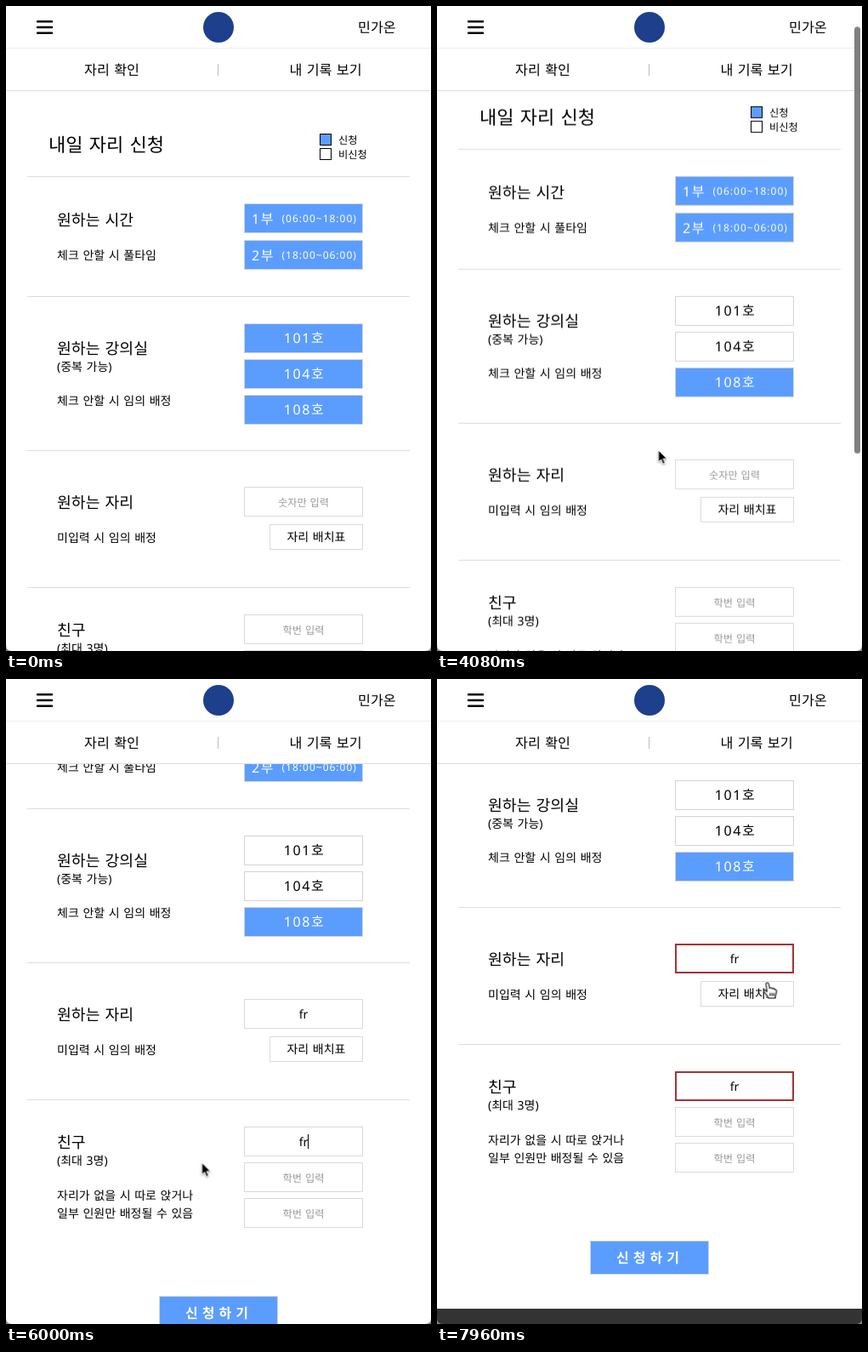
An HTML page for the animation above (8 s loop, 500 px wide and 758 px high).

```html
<!DOCTYPE html>
<html lang="ko">
<head>
<meta charset="utf-8">
<title>자리 신청</title>
<style>
html, body { margin: 0; width: 100%; height: 100%; overflow: hidden; background: #fff; }
svg { display: block; width: 100vw; height: 100vh; font-family: "Noto Sans", "Noto Sans CJK KR", "Noto Sans CJK", sans-serif; }
rect, line { shape-rendering: crispEdges; }
text { stroke: none; fill: currentColor; font-size: 14px; word-spacing: .07em; white-space: pre; text-rendering: geometricPrecision; }
.title { font-size: 22px; }
.head { font-size: 18.3px; }
.nav { font-size: 16.2px; }
.tiny { font-size: 12.2px; }
.mid { text-anchor: middle; }
.room { font-size: 16px; letter-spacing: 1.6px; }
.time { font-size: 12px; letter-spacing: 1px; }
.hint { font-size: 12.2px; color: #999; text-anchor: middle; }
.send { font-size: 16px; font-weight: 700; letter-spacing: 5px; }
.box { fill: #fff; stroke: #dadada; }
.rule { stroke: #ddd; }
.pick { fill: #5b9dff; stroke: #d3d3d3; color: #fff; }
.err { fill: none; stroke: #a83232; stroke-width: 2; }

/* everything shares one 8 s clock */
.scroll { animation: scroll 8s infinite; }
.step, .pick { animation: 8s step-end infinite; }
.hid { opacity: 0; }

@keyframes scroll {
  0% { transform: none; }
  50% { transform: none; animation-timing-function: cubic-bezier(.4, .15, .8, .8); }
  52.95%, 53.1% { transform: translateY(calc(var(--k) * 138px)); animation-timing-function: cubic-bezier(.1, .4, .4, 1); }
  57.5%, 78.5% { transform: translateY(calc(var(--k) * 189px)); animation-timing-function: ease-out; }
  81.4%, 100% { transform: translateY(calc(var(--k) * 254px)); }
}
.bar { opacity: 0; animation: bar 8s linear infinite; }
@keyframes bar {
  0%, 50.2% { opacity: 0; }
  50.4%, 61% { opacity: 1; }
  64%, 78.7% { opacity: 0; }
  78.9%, 84.4% { opacity: 1; }
  87.5%, 100% { opacity: 0; }
}

.part2 { animation-name: part2; }
.room1 { animation-name: room1; }
.room2 { animation-name: room2; }
@keyframes part2 {
  20.9% { fill: #fff; color: #000; }
  27.9% { fill: #5b9dff; color: #fff; }
}
@keyframes room1 { 37.4% { fill: #fff; color: #000; } }
@keyframes room2 { 42.4% { fill: #fff; color: #000; } }

.seatHint { animation-name: seatHint; }
.seatF { animation-name: seatF; }
.seatFr { animation-name: seatFr; }
.palHint { animation-name: palHint; }
.palF { animation-name: palF; }
.palFr { animation-name: palFr; }
.alert { animation-name: alert; }
@keyframes seatHint { 64.9% { opacity: 0; } }
@keyframes seatF { 64.9% { opacity: 1; } 66.4% { opacity: 0; } }
@keyframes seatFr { 66.4% { opacity: 1; } }
@keyframes palHint { 72.9% { opacity: 0; } }
@keyframes palF { 72.9% { opacity: 1; } 73.9% { opacity: 0; } }
@keyframes palFr { 73.9% { opacity: 1; } }
@keyframes alert { 94.9% { opacity: 1; } }

.caret { animation-name: caret; }
@keyframes caret {
  61.4% { opacity: 1; transform: translate(320px, 574px); }
  64.9% { opacity: 1; transform: translate(353px, 574px); }
  66.4% { opacity: 1; transform: translate(355px, 574px); }
  69.4% { opacity: 1; transform: translate(325px, 724px); }
  72.9% { opacity: 1; transform: translate(353px, 724px); }
  73.9% { opacity: 1; transform: translate(355px, 724px); }
  80.2% { opacity: 0; transform: translate(355px, 724px); }
  86.5% { opacity: 1; transform: translate(355px, 724px); }
  92.7% { opacity: 0; transform: translate(355px, 724px); }
}

.mouse { animation: mouse 8s ease-in-out infinite; }
@keyframes mouse {
  0% { transform: translate(252px, 770px); animation-timing-function: ease-out; }
  6%, 9% { transform: translate(236px, 425px); }
  16%, 29.5% { transform: translate(346px, 299.5px); }
  35.5%, 37.5% { transform: translate(326px, 394px); }
  42%, 45% { transform: translate(326px, 437.5px); }
  47%, 55% { transform: translate(260.5px, 522px); }
  59%, 65% { transform: translate(334.5px, 405px); }
  73.9% { transform: translate(290px, 548px); animation-timing-function: ease-out; }
  75%, 84% { transform: translate(230.5px, 568.5px); }
  92.5%, 95.1% { transform: translate(236px, 685px); animation-timing-function: ease-in; }
  98% { transform: translate(418px, 420px); animation-timing-function: ease-out; }
  99.4%, 100% { transform: translate(388.5px, 357.5px); }
}
.arrow { animation-name: arrow; }
.hand { animation-name: hand; }
.beam { animation-name: beam; }
@keyframes arrow {
  .4% { opacity: 1; }
  14.5% { opacity: 0; }
  31% { opacity: 1; }
  34% { opacity: 0; }
  46.2% { opacity: 1; }
  58% { opacity: 0; }
  73.9% { opacity: 1; }
  89.8% { opacity: 0; }
  95.9% { opacity: 1; }
  98.6% { opacity: 0; }
}
@keyframes hand {
  14.5% { opacity: 1; }
  31% { opacity: 0; }
  34% { opacity: 1; }
  46.2% { opacity: 0; }
  89.8% { opacity: 1; }
  95.9% { opacity: 0; }
  98.6% { opacity: 1; }
}
@keyframes beam { 58% { opacity: 1; } 64.9% { opacity: 0; } }
</style>
</head>
<body>
<svg viewBox="0 0 500 758" preserveAspectRatio="none">
  <g class="scroll" style="--k:-1">
    <text class="title" x="50" y="171">내일 자리 신청</text>
    <rect x="369.5" y="150.5" width="13" height="13" fill="#5b9dff" stroke="#000"/>
    <rect x="369.5" y="167.5" width="13" height="13" fill="#fff" stroke="#000"/>
    <text class="tiny" x="391" y="161.5">신청</text>
    <text class="tiny" x="391" y="178.8">비신청</text>
    <path class="rule" shape-rendering="crispEdges" d="M25 200.5H475M25 341.5H475M25 522.5H475M25 683.5H475"/>

    <text class="head" x="60" y="257.7">원하는 시간</text>
    <text x="60" y="298.2">체크 안할 시 풀타임</text>
    <g class="pick">
      <rect x="280.5" y="232.5" width="139" height="34"/>
      <text class="room" x="289" y="256">1부</text>
      <text class="time" x="324.5" y="254.3">(06:00~18:00)</text>
    </g>
    <g class="pick part2">
      <rect x="280.5" y="275.5" width="139" height="34"/>
      <text class="room" x="289" y="299">2부</text>
      <text class="time" x="324.5" y="297.3">(18:00~06:00)</text>
    </g>

    <text class="head" x="60" y="408.5">원하는 강의실</text>
    <text x="60" y="428.8">(중복 가능)</text>
    <text x="60" y="469.4">체크 안할 시 임의 배정</text>
    <g class="pick room1">
      <rect x="280.5" y="373.5" width="139" height="34"/>
      <text class="room mid" x="351" y="396.3">101호</text>
    </g>
    <g class="pick room2">
      <rect x="280.5" y="415.5" width="139" height="34"/>
      <text class="room mid" x="351" y="438.3">104호</text>
    </g>
    <g class="pick">
      <rect x="280.5" y="457.5" width="139" height="34"/>
      <text class="room mid" x="351" y="480.3">108호</text>
    </g>

    <text class="head" x="60" y="589.8">원하는 자리</text>
    <text x="60" y="630.2">미입력 시 임의 배정</text>
    <rect class="box" x="280.5" y="565.5" width="139" height="34"/>
    <rect class="err step hid alert" x="281" y="566" width="138" height="33"/>
    <text class="hint step seatHint" x="350" y="587.6">숫자만 입력</text>
    <text class="mid step hid seatF" x="350" y="588">f</text>
    <text class="mid step hid seatFr" x="350" y="588">fr</text>
    <rect class="box" x="310.5" y="609.5" width="109" height="29"/>
    <text class="mid" x="365" y="629.2">자리 배치표</text>

    <text class="head" x="60" y="739.8">친구</text>
    <text x="60" y="760.2">(최대 3명)</text>
    <text x="60" y="801.4">자리가 없을 시 따로 앉거나</text>
    <text x="60" y="822">일부 인원만 배정될 수 있음</text>
    <rect class="box" x="280.5" y="715.5" width="139" height="34"/>
    <rect class="box" x="280.5" y="757.5" width="139" height="34"/>
    <rect class="box" x="280.5" y="799.5" width="139" height="34"/>
    <rect class="err step hid alert" x="281" y="716" width="138" height="33"/>
    <text class="hint step palHint" x="350" y="737.6">학번 입력</text>
    <text class="mid step hid palF" x="350" y="738">f</text>
    <text class="mid step hid palFr" x="350" y="738">fr</text>
    <text class="hint" x="350" y="779.6">학번 입력</text>
    <text class="hint" x="350" y="821.6">학번 입력</text>
    <rect class="step hid caret" width="1" height="17"/>

    <g class="pick">
      <rect x="180.5" y="914.5" width="139" height="39"/>
      <text class="send mid" x="250.5" y="940.4">신청하기</text>
    </g>
    <rect y="994" width="500" height="154" fill="#333"/>
  </g>

  <rect width="500" height="100" fill="#fff"/>
  <path d="M0 49.5H500" stroke="#eee" shape-rendering="crispEdges"/>
  <path class="rule" d="M0 99.5H500" shape-rendering="crispEdges"/>
  <path d="M37 18.3H54M37 25H54M37 31.7H54" stroke="#000" stroke-width="2.4" stroke-linecap="round"/>
  <circle cx="250" cy="25" r="18" fill="#1d3f8c"/>
  <text class="nav" x="414" y="31">민가온</text>
  <text class="nav mid" x="124.5" y="81">자리 확인</text>
  <text class="nav mid" x="376" y="81">내 기록 보기</text>
  <path d="M249.5 68V82" stroke="#bbb" shape-rendering="crispEdges"/>

  <g class="bar">
    <rect class="scroll" style="--k:.656;shape-rendering:auto" x="491" y="3.3" width="7" height="501.5" rx="3.5" fill="#7f7f7f"/>
  </g>
  <path d="M0 751V758H7Q0 758 0 751ZM500 751V758H493Q500 758 500 751Z" fill="#888"/>

  <g class="mouse">
    <path class="step hid arrow" d="M0 0V14L3.2 11 5.4 16.2 7.8 15.2 5.6 10.1H10Z" fill="#000" stroke="#fff" stroke-width="1" style="filter:drop-shadow(0 1px 1px #0006)"/>
    <path class="step hid hand" d="M-1.5 1C-1.5-1 1.4-1 1.8 1L2.8 6C3.5 5 5.5 5 6 6.6 6.8 5.6 8.4 6 8.6 7.4 9.8 6.8 11 7.8 10.8 9.4 10.8 12 10 13.5 9.6 15L9.4 17.5H1.6C1 15.5-2 12.5-4 10-5 8.4-3 7.2-1.8 8.6L-.2 10ZM3.4 11.5V15M5.7 11.5V15M7.9 11.5V15" fill="#fff" stroke="#000" stroke-width="1.1" stroke-linejoin="round"/>
    <g class="step hid beam" fill="none" stroke-linecap="round">
      <defs><path id="stem" d="M-3-7Q0-7 0-5 0-7 3-7M0-5V5M-3 7Q0 7 0 5 0 7 3 7M-1.5 2.5H1.5"/></defs>
      <use href="#stem" stroke="#fff" stroke-width="2.4"/>
      <use href="#stem" stroke="#000" stroke-width="1.1"/>
    </g>
  </g>
</svg>
</body>
</html>
```
